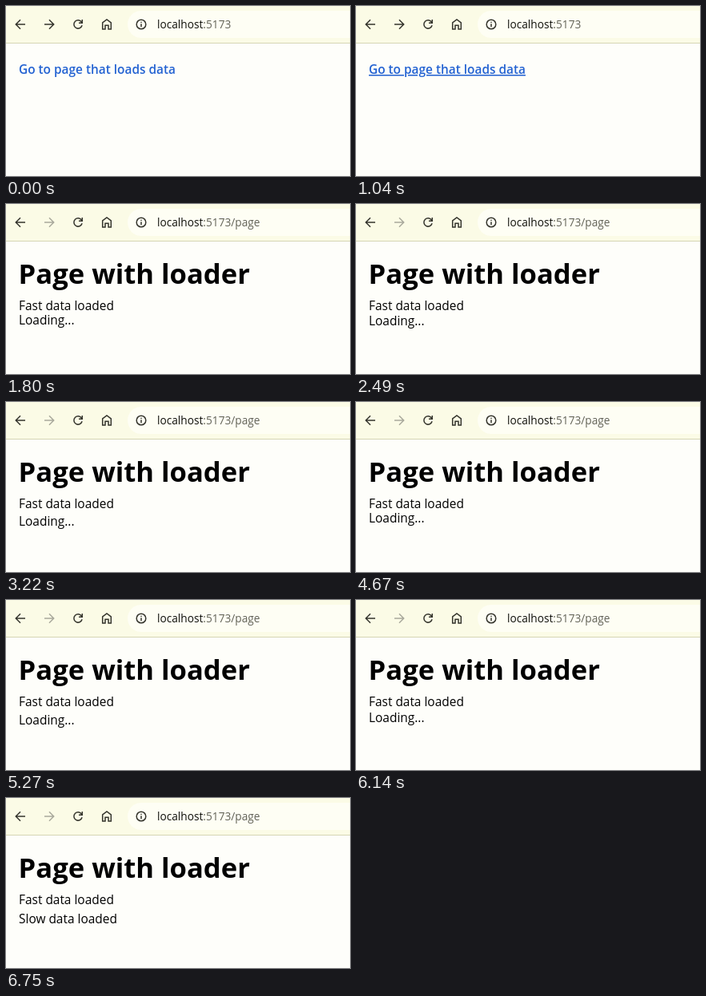
Recreate the animation shown at these times as an HTML page. Size 430 by 213 pixels, loop 8 s.

```html
<!DOCTYPE html>
<html lang="en">
<head>
<meta charset="utf-8">
<title>Page with loader</title>
<style>
  html, body { margin: 0; width: 100%; height: 100%; overflow: hidden; background: #fefefa; }
  svg { display: block; width: 430px; height: 213px; }
  text { font: 450 15.45px "Open Sans", "Noto Sans", sans-serif; fill: #000; white-space: pre; }
  .url { font-size: 13.7px; fill: #626258; }
  .url .host { fill: #10100c; }
  .link { font-size: 15.4px; font-weight: 600; fill: #2463d2; }
  .link.hover { text-decoration: underline; }
  .title { font-size: 34.6px; font-weight: 700; }
  .icon { fill: none; stroke: #34342c; stroke-width: 1.5; }
</style>
</head>
<body>
<svg viewBox="0 0 430 213">
  <rect width="430" height="213" fill="#fefefa"/>
  <rect width="430" height="46" fill="#fbfbe6"/>
  <rect x="152" y="6" width="300" height="34" rx="17" fill="#fefef4"/>
  <rect y="46" width="430" height="1" fill="#d6d6b4"/>

  <path class="icon" d="M24 23H12.5M18 17.3L12.3 23L18 28.7"/>
  <path class="icon" id="forward" d="M48 23H59.5M54 17.3L59.7 23L54 28.7"/>
  <path class="icon" d="M94.6 20.3A5.2 5.2 0 1 0 95.1 24.3M95.3 17V21.2H91"/>
  <path class="icon" d="M120.7 29V20.9L126 16.9L131.3 20.9V29H128V24.2H124V29Z"/>
  <circle class="icon" cx="169" cy="23" r="5.8"/>
  <path class="icon" d="M169 22.3V26.2M169 19.7V21.1"/>
  <text class="url" x="189" y="28"><tspan class="host">localhost</tspan>:5173<tspan id="path">/page</tspan></text>

  <text class="link" id="link" x="16" y="85">Go to page that loads data</text>
  <g id="page">
    <text class="title" x="15.6" y="100">Page with loader</text>
    <text x="16" y="133">Fast data loaded</text>
    <text id="loading" x="16" y="157">Loading...</text>
    <text id="slow" x="16" y="157">Slow data loaded</text>
  </g>
</svg>
<script>
  const LOOP = 8000, HOVER = 1040, OPEN = 1800, DONE = 6750;
  const BOUNCE_START = 1785, BOUNCE_PERIOD = 1000, BOUNCE_HEIGHT = 6;
  const el = id => document.getElementById(id);
  const show = (id, on) => el(id).setAttribute("display", on ? "inline" : "none");

  // CSS-style cubic Bezier easing, solved by bisection
  function bezier(x1, y1, x2, y2) {
    const at = (a, b, t) => 3 * (1 - t) * (1 - t) * t * a + 3 * (1 - t) * t * t * b + t * t * t;
    return x => {
      let lo = 0, hi = 1;
      for (let i = 0; i < 24; i++) {
        const mid = (lo + hi) / 2;
        if (at(x1, x2, mid) < x) lo = mid; else hi = mid;
      }
      return at(y1, y2, (lo + hi) / 2);
    };
  }
  const fall = bezier(0.8, 0, 1, 1);
  const rise = bezier(0, 0, 0.2, 1);

  function bounce(ms) {
    const p = (ms % BOUNCE_PERIOD) / BOUNCE_PERIOD * 2;
    return -BOUNCE_HEIGHT * (p < 1 ? 1 - fall(p) : rise(p - 1));
  }

  function draw(t) {
    const open = t >= OPEN, done = t >= DONE;
    show("link", !open);
    show("page", open);
    show("path", open);
    show("loading", open && !done);
    show("slow", done);
    el("link").classList.toggle("hover", t >= HOVER);
    el("forward").style.stroke = open ? "#a9a99c" : "";
    if (open && !done) {
      el("loading").setAttribute("transform", `translate(0 ${bounce(t - BOUNCE_START).toFixed(3)})`);
    }
  }

  const start = performance.now();
  function tick(now) {
    draw(Math.max(0, now - start) % LOOP);
    requestAnimationFrame(tick);
  }
  draw(0);
  requestAnimationFrame(tick);
</script>
</body>
</html>
```
